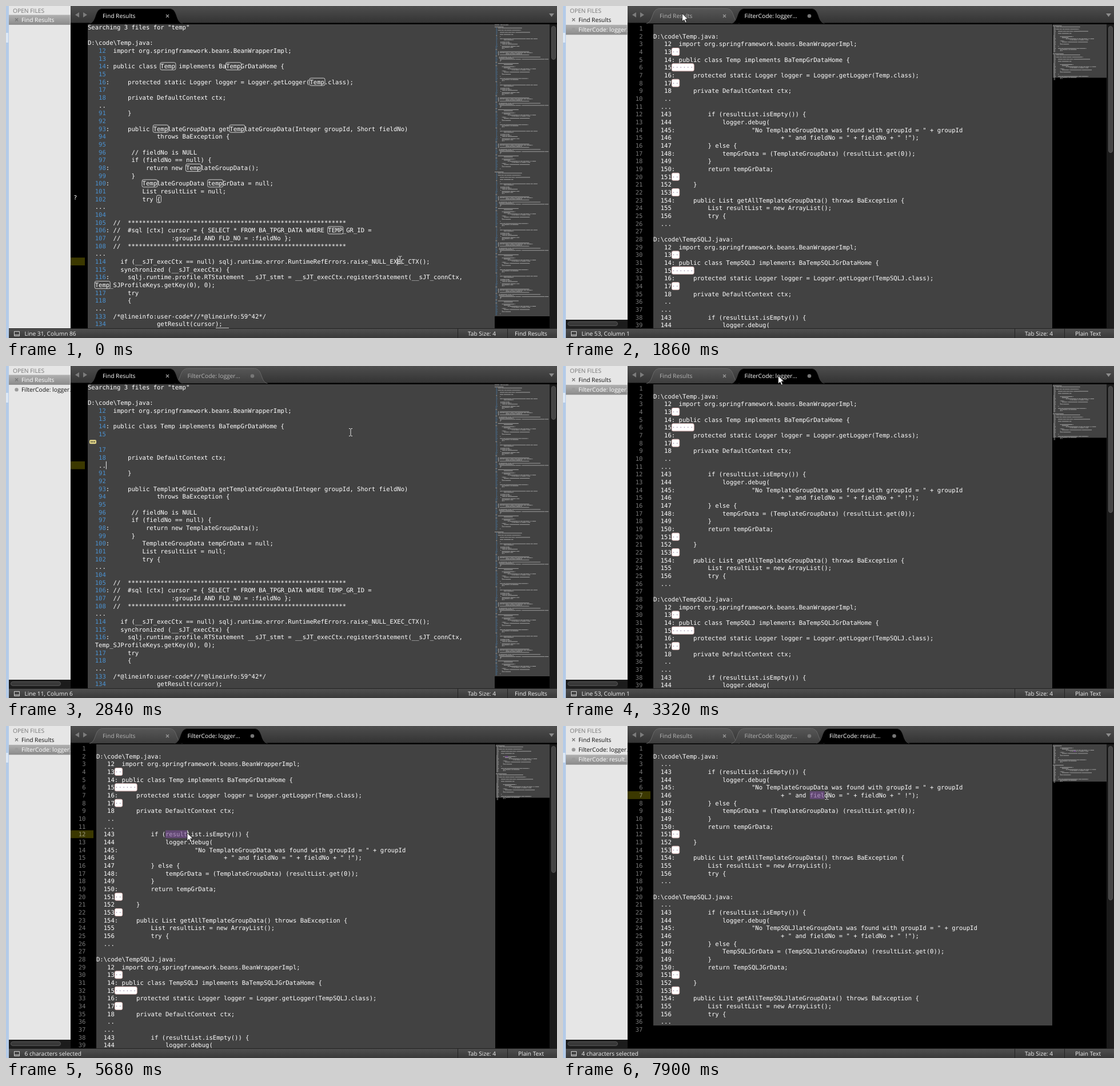
Write an HTML page that moves like this. It is 964 px wide and 581 px high and loops after 8000 ms.

```html
<!DOCTYPE html>
<html lang="en">
<head>
<meta charset="utf-8">
<title>Filtering find results</title>
<style>
  html, body { margin: 0; width: 100%; height: 100%; overflow: hidden; background: #000; }
  svg { display: block; width: 964px; height: 581px; }
  text { text-rendering: geometricPrecision; }
  .code { font: 10.58px "DejaVu Sans Mono", monospace; fill: #fff; }
  .ui { font: 10.25px "Open Sans", "Noto Sans", sans-serif; fill: #f2f2f2; }
  .status { font-size: 10.15px; }
  .num { fill: #4b93d3; }
  .line { fill: #787878; }
  .dots { fill: #a08cab; }
  .tab path { fill: url(#tabOff); stroke: #686868; }
  .tab .ui { fill: #b4b4b4; }
  .tab.on path { fill: #000; stroke: #3c3c3c; }
  .tab.on .ui { fill: #fff; }
  .item rect { fill: none; }
  .item .ui { fill: #111; }
  .item.on rect { fill: url(#item); }
  .item.on .ui { fill: #fff; }
</style>
</head>
<body>
<svg id="stage" viewBox="0 0 964 581" xmlns="http://www.w3.org/2000/svg">
  <defs>
    <linearGradient id="strip" x2="0" y2="1"><stop stop-color="#4e4e4e"/><stop offset="1" stop-color="#333"/></linearGradient>
    <linearGradient id="tabOff" x2="0" y2="1"><stop stop-color="#565656"/><stop offset="1" stop-color="#3e3e3e"/></linearGradient>
    <linearGradient id="item" x2="0" y2="1"><stop stop-color="#b0b0b0"/><stop offset="1" stop-color="#8a8a8a"/></linearGradient>
    <linearGradient id="bar" x2="0" y2="1"><stop stop-color="#505050"/><stop offset="1" stop-color="#393939"/></linearGradient>
    <clipPath id="sideClip"><rect x="5" width="107.5" height="565"/></clipPath>
  </defs>
  <rect width="964" height="581"/>
  <g id="panes"></g>
  <g id="marks"></g>
  <g id="chrome">
    <rect x="951" y="31" width="13" height="534" fill="#1b1b1b"/>
    <rect id="thumb" x="954.5" y="35.5" width="7" rx="3.5" fill="#444" stroke="#545454"/>
    <rect x="113" width="851" height="30" fill="url(#strip)"/>
    <rect x="113" y="29.5" width="851" height="2.5"/>
    <path d="M128 11v9l-7-4.500zM135 11v9l7-4.500z" fill="#7c7c7c"/>
    <path d="M950 13h9l-4.500 6z" fill="#8c8c8c"/>
    <g id="tabs"></g>
    <rect width="5" height="581" fill="#b4cbe8"/>
    <rect y="47" width="4" height="17" fill="#dce8f6"/>
    <rect x="5" width="108" height="565" fill="#e6e6e6"/>
    <text class="ui" x="12" y="12" style="fill:#777">OPEN FILES</text>
    <g id="items" clip-path="url(#sideClip)"></g>
    <g id="sideScroll">
      <rect x="5" y="549" width="108" height="16" fill="#1c1c1c"/>
      <rect x="8.500" y="552.500" width="87" height="7" rx="3.500" fill="#383838" stroke="#545454"/>
    </g>
    <rect x="5" y="564" width="959" height="17" fill="url(#bar)"/>
    <path d="M5 564.500H964M790.500 565v16M877.500 565v16" stroke="#222"/>
    <path d="M14.500 569.500h9v8h-9zM15 575.500h8" fill="none" stroke="#d0d0d0"/>
    <text class="ui status" id="status" x="32.500" y="577.200"></text>
    <text class="ui status" x="832.500" y="577.200" text-anchor="middle">Tab Size: 4</text>
    <text class="ui status" id="syntax" x="918.500" y="577.200" text-anchor="middle"></text>
    <g id="panel">
      <rect x="5" y="535" width="959" height="29" fill="url(#bar)"/>
      <path d="M5 535.500H964" stroke="#222"/>
      <text class="ui" x="8" y="554">FilterCode - match condition:</text>
      <rect x="152" y="541" width="809" height="18" fill="#efefef"/>
      <text class="code" id="typed" x="155" y="554" style="fill:#000"></text>
      <rect id="typedCaret" y="543" width="1" height="13"/>
    </g>
  </g>
  <path id="arrow" d="M0 0V14l3.300-3 2.300 5.300 2.300-1L5.600 10H10z" fill="#fff" stroke="#111" stroke-width=".8"/>
  <g id="beam" fill="none">
    <path d="M-3-6.500H-1L0-5.500 1-6.500H3M0-5.500V5.500M-3 6.500H-1L0 5.500 1 6.500H3" stroke="#e8e8e8"/>
  </g>
</svg>
<script>
const CW = 6.369, ROW = 13.67, MAP_W = 0.85, MAP_H = 1.88;
const GREY = '#424242', PURPLE = '#644d70';
const $ = id => document.getElementById(id);

function el(parent, tag, attrs, text) {
  const node = document.createElementNS('http://www.w3.org/2000/svg', tag);
  for (const k in attrs) node.setAttribute(k, attrs[k]);
  if (text) node.textContent = text;
  return parent.appendChild(node);
}
const rect = (parent, x, y, width, height, fill, more) =>
  el(parent, 'rect', { x, y, width, height, fill, ...more });
const show = (node, on) => node.setAttribute('visibility', on ? 'inherit' : 'hidden');

// Numbered blank lines keep their trailing spaces
const trail = { 15: 6, 95: 10 };
const lines = (...args) => String.raw(...args).split('\n').slice(1, -1).map(s => {
  const blank = s.match(/^ +(\d+)$/);
  return blank ? s + ' '.repeat(trail[blank[1]] || 2) : s;
});

const head = lines`
   12  import org.springframework.beans.BeanWrapperImpl;
   13
   14: public class Temp implements BaTempGrDataHome {
   15
   16:     protected static Logger logger = Logger.getLogger(Temp.class);
   17
   18      private DefaultContext ctx;
   ..
`;
const rest = lines`
   91      }
   92
   93:     public TemplateGroupData getTemplateGroupData(Integer groupId, Short fieldNo)
   94              throws BaException {
   95
   96       // fieldNo is NULL
   97       if (fieldNo == null) {
   98:          return new TemplateGroupData();
   99       }
  100:         TemplateGroupData tempGrData = null;
  101          List resultList = null;
  102          try {
  ...
  104
  105  //  ${'*'.repeat(60)}
  106: //  #sql [ctx] cursor = { SELECT * FROM BA_TPGR_DATA WHERE TEMP_GR_ID =
  107  //              :groupId AND FLD_NO = :fieldNo };
  108  //  ${'*'.repeat(60)}
  ...
  114    if (__sJT_execCtx == null) sqlj.runtime.error.RuntimeRefErrors.raise_NULL_EXEC_CTX();
  115    synchronized (__sJT_execCtx) {
  116:     sqlj.runtime.profile.RTStatement __sJT_stmt = __sJT_execCtx.registerStatement(__sJT_connCtx,
  Temp_SJProfileKeys.getKey(0), 0);
  117      try
  118      {
  ...
  133  /*@lineinfo:user-code*//*@lineinfo:59^42*/
  134              getResult(cursor);
`;
const tail = lines`
  ...
  143          if (resultList.isEmpty()) {
  144              logger.debug(
  145:                     "No TemplateGroupData was found with groupId = " + groupId
  146                              + " and fieldNo = " + fieldNo + " !");
  147          } else {
  148:             tempGrData = (TemplateGroupData) (resultList.get(0));
  149          }
  150:         return tempGrData;
  151
  152      }
  153
  154:     public List getAllTemplateGroupData() throws BaException {
  155          List resultList = new ArrayList();
  156          try {
  ...
`;
const path = 'D:\\code\\Temp.java:';
const found = ['Searching 3 files for "temp"', '', path, ...head, ...rest];
const twoFiles = body => {
  const block = [path, ...body];
  return ['', ...block, '', ...block.map(s => s.replace(/temp/gi, 'TempSQLJ')), ''];
};

// The overview shows all results unwrapped: two files of 135 lines
const unwrap = rows => rows.join('\n').replace(/\n +(?=Temp_)/, ' ').split('\n');
const fileMap = unwrap(found.slice(2));
while (fileMap.length < 134) fileMap.push(...tail, ...unwrap(rest));
fileMap.length = 134;
const longMap = [...found.slice(0, 2), ...fileMap, '', ...fileMap, ''];

function words(parent, str, x, y, cls) {
  for (const m of str.matchAll(/\S+(?: \S+)*/g))
    el(parent, 'text', { class: 'code ' + cls, x: x + m.index * CW, y }, m[0]);
}

function minimap(g, rows, x, selected) {
  let text = '', nums = '', sel = '';
  rows.forEach((row, i) => {
    const y = 32 + (i + 0.5) * MAP_H, s = row.slice(0, (950 - x) / MAP_W);
    if (s) sel += `M${x} ${y}h${(s.length + 1) * MAP_W}`;
    for (const m of s.matchAll(/\S+/g)) {
      const run = `M${x + m.index * MAP_W} ${y}h${m[0].length * MAP_W}`;
      if (/^\d+:?$/.test(m[0])) nums += run; else text += run;
    }
  });
  el(selected, 'path', { d: sel, stroke: PURPLE, 'stroke-width': MAP_H });
  const dash = { 'stroke-dasharray': '1.6 .4', 'stroke-width': 1, opacity: 0.62 };
  el(g, 'path', { d: text, stroke: '#fff', ...dash });
  el(g, 'path', { d: nums, stroke: x < 857 ? '#4b93d3' : '#fff', ...dash });
}

function makePane({ rows, x, mid, thumb, numbered, folded, map = rows }) {
  const g = el($('panes'), 'g', {});
  const mapX = numbered ? 857 : 855;
  const height = numbered ? Math.min(533, (rows.length - 1) * ROW) : 533;
  rect(g, x, 32, (numbered ? 856 : 855) - x, height, GREY);
  rect(g, mapX, 32, 951 - mapX, numbered ? map.length * 1.765 : 511, GREY);
  const selection = el(g, 'g', {});
  minimap(g, map, mapX, selection);

  rows.slice(0, 39).forEach((s, i) => {
    const c = mid + i * ROW, base = c + 4;
    if (numbered)
      el(g, 'text', { class: 'code line', x: 139.5, y: base, 'text-anchor': 'end' }, String(i + 1));
    if (folded) {
      const from = s.startsWith('  Temp') ? 2 : 0;
      rect(selection, x + from * CW, c - ROW / 2, (s.length + 1 - from) * CW, ROW + 0.1, PURPLE);
      const tabbed = /^ +9[6-9]/.test(s);
      const spaces = [...s].map((ch, k) => ch === ' ' && !(tabbed && k > 6 && k < 12) ? '·' : ' ');
      if (i !== 7) words(selection, spaces.join(''), x, base, 'dots');
      if (tabbed) rect(selection, x + 7 * CW, c, 5 * CW - 1, 1, '#a08cab');
      if (i === 7) {
        rect(g, 146, c - 3.5, 12, 7, '#e6d98a', { rx: 2 });
        for (let k = 0; k < 3; k++) rect(g, 148 + k * 3, c - 1, 2, 2, '#443');
        return;
      }
    }
    const num = s.match(/^ +\d+/);
    if (num) {
      words(g, num[0], x, base, numbered ? '' : 'num');
      words(g, s.replace(num[0], ' '.repeat(num[0].length)), x, base, '');
    } else words(g, s, x, base, '');
    if (numbered && /\d +$/.test(s)) {
      const n = s.length - 5, fx = x + 5 * CW;
      rect(g, fx + 0.5, c - 6.5, n * CW + 0.6, 13, '#fff', { rx: 2.5, stroke: '#e2bcbc' });
      words(g, '·'.repeat(n), fx + 0.3, base, 'dots');
    }
    if (!numbered && !folded && i > 2)
      for (const m of s.matchAll(/temp|(?<=try ){/gi))
        rect(g, x + m.index * CW - 0.5, c - 6.5, m[0].length * CW + 1.5, 13, 'none', { rx: 2.5, stroke: '#d2d2d2' });
  });
  if (!numbered && !folded) {
    rect(g, 367, 563, 23, 1, '#d2d2d2');
    el(g, 'text', { class: 'code', x: 118, y: 339 }, '?');
  }
  return { g, x, mid, thumb, selection };
}

const foldedRows = found.map((s, i) => i === 7 ? '   ' : s);
const panes = [
  makePane({ rows: found, x: 143, mid: 37, thumb: 58, map: longMap }),
  makePane({ rows: foldedRows, x: 143, mid: 37, thumb: 58, map: longMap, folded: true }),
  makePane({ rows: twoFiles([...head, ...tail]), x: 158, mid: 39, thumb: 221, numbered: true }),
  makePane({ rows: twoFiles(tail), x: 158, mid: 39, thumb: 269, numbered: true })
];

const tabs = ['Find Results', 'FilterCode: logger...', 'FilterCode: result...'].map((name, i) => {
  const tab = el($('tabs'), 'g', { transform: `translate(${148.5 * i})` });
  el(tab, 'path', { d: 'M146 30.500C159 28 154 4.500 169 4.500H286C301 4.500 296 28 309 30.500' });
  el(tab, 'text', { class: 'ui', x: 169, y: 21 }, name);
  const item = el($('items'), 'g', { transform: `translate(0 ${17.4 * i})` });
  rect(item, 5, 15.5, 108, 17.4);
  el(item, 'text', { class: 'ui', x: 27, y: 27.5 }, name);
  if (i) {
    el(tab, 'circle', { cx: 282.5, cy: 17.5, r: 3.3, fill: '#777' });
    el(item, 'circle', { cx: 18.5, cy: 24, r: 3.2, fill: '#9a9a9a' });
  } else {
    el(tab, 'path', { d: 'M280 15l5 5m0-5l-5 5', style: 'fill:none;stroke:#999;stroke-width:1.300' });
    el(item, 'path', { d: 'M16 21.500l5 5m0-5l-5 5', stroke: '#777', 'stroke-width': 1.3 });
  }
  return { tab, item };
});

// Timeline: each entry patches the state and holds until the next
const steps = [];
const at = (time, patch) => steps.push({ time, patch });
const beam = (x, y) => ({ mouse: [x, y, 'beam'] });
const arrow = (x, y) => ({ mouse: [x, y, 'arrow'] });
const place = (row, col) => ({ caret: [row, col], sel: 0, status: `Line ${row + 1}, Column ${col + 1}` });

function drag(start, row, col, count, [x0, x1], y) {
  for (let i = 0; i <= 10; i++) {
    const n = Math.max(1, Math.round(count * i / 10));
    at(start + i * 80, {
      ...beam(x0 + (x1 - x0) * i / 10, y), caret: [row, col + n], sel: n, brackets: [],
      status: `${n} character${n > 1 ? 's' : ''} selected`
    });
  }
}

at(0, { pane: 0, tabs: 1, panel: null, all: false, brackets: [], ...place(30, 85), ...beam(689.5, 444.5) });
at(240, { panel: '', caret: null });
[320, 480, 710, 1040, 1350, 1430].forEach((t, i) => at(t, { panel: 'logger'.slice(0, i + 1) }));
at(1590, { panel: null, pane: 2, tabs: 2, ...place(52, 0) });
at(1680, beam(515, 305));
at(1770, beam(330, 130));
at(1860, arrow(208.5, 13));
at(2140, { pane: 1, all: true, caret: null, status: '272 lines, 11280 characters selected' });
at(2220, beam(262, 90));
at(2300, beam(333.5, 173));
at(2610, { all: false, ...place(10, 5) });
at(2760, beam(440, 158));
at(2840, beam(603, 116));
at(2920, beam(560, 68));
at(3000, beam(450, 40));
at(3080, arrow(376.5, 17));
at(3320, { pane: 2, ...place(52, 0) });
at(3480, beam(281.5, 189));
at(3710, { ...place(11, 19), brackets: [[11, 18], [11, 39]] });
drag(3860, 11, 19, 6, [281.5, 318.5], 188);
at(4740, beam(317.5, 188));
at(4970, arrow(317, 187));
at(5520, { caretOff: true });
at(5680, { caretOff: false });
at(5840, { pane: 3, tabs: 3, ...place(36, 0), ...beam(317.5, 188) });
at(6000, beam(433.5, 121.5));
at(6080, { ...place(6, 43), brackets: [[4, 31], [6, 71]] });
drag(6230, 6, 43, 4, [433.5, 458.5], 122);
at(7110, beam(457.5, 122));
at(7420, { caretOff: true });
at(7500, { caretOff: false });
at(7580, { caretOff: true });
at(7740, beam(459, 122));
at(7820, beam(460.5, 122));
at(7900, beam(461.5, 122));

function render(s) {
  const pane = panes[s.pane], active = Math.max(0, s.pane - 1);
  panes.forEach(p => show(p.g, p === pane));
  panes.forEach(p => show(p.selection, p === pane && s.all));
  tabs.forEach(({ tab, item }, i) => {
    const on = i === active;
    tab.setAttribute('class', on ? 'tab on' : 'tab');
    item.setAttribute('class', on ? 'item on' : 'item');
    show(tab, i < s.tabs);
    show(item, i < s.tabs);
  });
  $('tabs').append(tabs[active].tab);
  show($('sideScroll'), s.tabs > 1);
  $('thumb').setAttribute('height', s.panel === null ? pane.thumb : 52);
  $('status').textContent = s.status;
  $('syntax').textContent = active ? 'Plain Text' : 'Find Results';

  show($('panel'), s.panel !== null);
  $('typed').textContent = s.panel || '';
  $('typedCaret').setAttribute('x', 155 + (s.panel || '').length * CW);

  const marks = $('marks');
  marks.textContent = '';
  // Line highlight stays while the input panel has the focus
  const row = s.panel !== null ? 30 : s.caret && s.caret[0];
  const top = r => pane.mid + r * ROW - ROW / 2;
  if (row !== null && row < 39)
    rect(marks, 113, top(row), pane.x - 118, ROW, '#4a4600', { opacity: 0.8, style: 'mix-blend-mode:screen' });
  if (s.caret && row < 39) {
    const cx = pane.x + s.caret[1] * CW, w = s.sel * CW;
    if (s.sel) {
      rect(marks, cx - w, top(row), w, ROW, '#7a4f96', { opacity: 0.6 });
      rect(marks, 857 + (s.caret[1] - s.sel) * MAP_W, 32 + row * MAP_H, s.sel * MAP_W, MAP_H, '#7a4f96');
    }
    if (!s.caretOff) rect(marks, cx, top(row), 1, ROW, '#f0f0f0');
  }
  for (const [r, col] of s.brackets) rect(marks, pane.x + col * CW, top(r) + 12.5, CW, 1, '#e0e0e0');

  const [x, y, kind] = s.mouse;
  for (const id of ['arrow', 'beam']) show($(id), id === kind);
  $(kind).setAttribute('transform', `translate(${x} ${y})`);
}

let shown = -1;
function tick() {
  const t = performance.now() % 8000;
  const count = steps.filter(s => s.time <= t).length;
  if (count !== shown) {
    shown = count;
    render(Object.assign({}, ...steps.slice(0, count).map(s => s.patch)));
  }
  requestAnimationFrame(tick);
}
tick();
</script>
</body>
</html>
```
